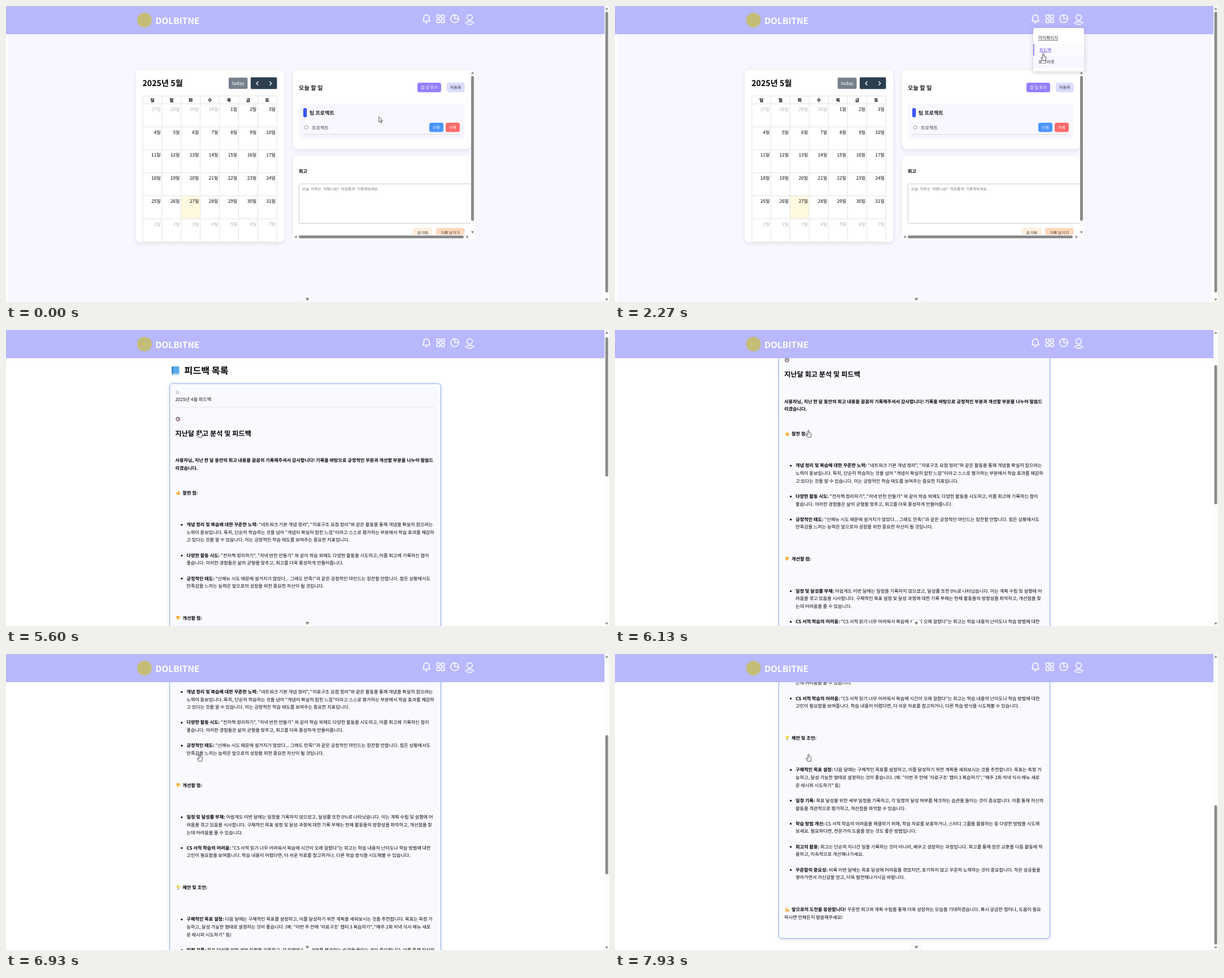
Recreate the animation shown at these times as an HTML page. Size 1067 by 525 pixels, loop 8 s.

```html
<!DOCTYPE html>
<html>
<head>
<meta charset="utf-8">
<style>
  html, body { margin: 0; width: 100%; height: 100%; overflow: hidden; background: #fff; }
  svg { display: block; width: 1067px; height: 525px; }
  text { font-family: 'Noto Sans CJK KR', 'Noto Sans CJK', 'Noto Sans', sans-serif; text-rendering: geometricPrecision; white-space: pre; }
  .mono { font-family: 'Noto Sans Mono CJK KR', 'Noto Sans Mono', monospace; }
  .m { font-weight: 500; }
  .b { font-weight: 700; }
  .u { text-decoration: underline; }
  .soft { filter: drop-shadow(0 2px 3px rgba(60, 60, 110, .13)); }
</style>
</head>
<body>
<svg id="stage" viewBox="0 0 1067 525"></svg>
<script>
const BODY = 8.155, LINE = 13.63;

// cy is the optical middle of the line of text
const text = (x, cy, size, str, attrs = '') =>
  `<text x="${x}" y="${cy + size * .38}" font-size="${size}" ${attrs}>${str}</text>`;
const box = (x, y, x2, y2, fill, r = 0, attrs = '') =>
  `<rect x="${x}" y="${y}" width="${x2 - x}" height="${y2 - y}" rx="${r}" fill="${fill}" ${attrs}/>`;
const path = (d, attrs) => `<path d="${d}" ${attrs}/>`;
const button = (x, y, x2, y2, fill, label, color, size = 7.1) =>
  box(x, y, x2, y2, fill, 3.5) +
  text((x + x2) / 2, (y + y2) / 2 + .3, size, label, `class="m" text-anchor="middle" fill="${color}"`);
const triangle = (x, y, angle, size = 2.6) =>
  path(`M${-size} ${size * .8}L0 ${-size * .8}L${size} ${size * .8}Z`,
    `transform="translate(${x} ${y}) rotate(${angle})" fill="#858585"`);

function header() {
  const square = (x, y) => box(x, y, x + 5.6, y + 5.6, 'none', 1.5);
  return `<circle cx="245" cy="25" r="13" fill="#c3bd78"/>` +
    text(264.5, 26, 15.4, 'DOLBITNE', 'class="b" fill="#fff"') +
    `<g fill="none" stroke="#fff" stroke-width="1.6" stroke-linecap="round" stroke-linejoin="round">` +
    path('M737.8 26.8H750.2C748.7 25 748.8 23 748.7 20.5a4.7 4.9 0 0 0-9.4 0C739.2 23 739.3 25 737.8 26.8ZM742.3 29.6h3.4') +
    square(762.3, 15.7) + square(770.3, 15.7) + square(762.3, 23.8) + square(770.3, 23.8) +
    path('M794 15.5a7 7 0 1 0 7 7a7 7 0 0 0-7-7V22.5H801') +
    `<circle cx="820.5" cy="20.2" r="4.8"/>` +
    path('M813 30.8C816 26.2 825 26.2 828 30.8M816.5 32Q820.5 33 824.5 32') + '</g>';
}

function calendar() {
  const left = 242, top = 173.5, w = 33.9, h = 40.75;
  let s = box(229.5, 113.5, 492.5, 419, '#fff', 8, 'class="soft"') +
    text(241.5, 137, 14.2, '2025년 5월', 'class="b"') +
    box(394, 127, 427.5, 147, '#76818d', 2) +
    text(410.7, 137.2, BODY, 'today', 'text-anchor="middle" fill="#fff"') +
    box(433, 126.5, 479.5, 147.3, '#2c3e50', 2) +
    path('M446.5 133.7L443.2 137.2L446.5 140.7M466.5 133.7L469.8 137.2L466.5 140.7',
      'fill="none" stroke="#fff" stroke-width="1.3"') +
    box(left + 2 * w, top + 4 * h, left + 3 * w, top + 5 * h, '#fffadf');
  let lines = `M${left} 159.5h${7 * w}`;
  for (let r = 0; r < 7; r++) lines += `M${left} ${top + r * h}h${7 * w}`;
  for (let c = 0; c < 8; c++) lines += `M${left + c * w} 159.5V${top + 6 * h}`;
  s += path(lines, 'fill="none" stroke="#ddd" stroke-width=".8"');
  [...'일월화수목금토'].forEach((d, c) =>
    s += text(left + (c + .5) * w, 167, BODY, d, 'class="b" text-anchor="middle"'));
  for (let i = 0; i < 42; i++) {
    const n = i - 3, day = n < 1 ? n + 30 : n > 31 ? n - 31 : n;
    s += text(left + (i % 7 + 1) * w - 2.2, top + (i / 7 | 0) * h + 9.2, BODY, day + '일',
      `text-anchor="end" fill-opacity="${n === day ? 1 : .3}"`);
  }
  return s;
}

function todo() {
  return `<clipPath id="pane"><rect x="498" y="104" width="324" height="301.5"/></clipPath>` +
    box(508, 404, 829, 414, '#fcfcfd') + box(821.5, 113.5, 829, 414, '#fcfcfd') +
    `<g clip-path="url(#pane)">` +
    box(508, 113.5, 822, 254, '#fff', 8, 'class="soft"') +
    text(518, 145, 10.3, '오늘 할 일', 'class="b" fill="#222"') +
    button(728, 136, 770, 153, '#9381ff', '할 일 추가', '#fff') +
    button(780, 136, 811.5, 153, '#dcdcff', '자동화', '#333') +
    box(518, 173, 811.5, 236, '#f8f7ff', 4) +
    box(526, 181, 532.3, 197.5, '#3a55ff', 3) +
    text(537, 189.3, 9.1, '팀 프로젝트', 'class="b" fill="#222"') +
    box(528.6, 212.7, 534, 218.1, '#fff', 1, 'stroke="#767676" stroke-width=".7"') +
    text(541, 215.6, BODY, '프로젝트', 'fill="#444"') +
    button(749, 207, 774, 223.5, '#4d96ff', '수정', '#fff', 6.8) +
    button(778, 207, 803, 223.5, '#ff6b6b', '삭제', '#fff', 6.8) +
    box(526, 227.5, 803, 228.3, '#ccc') +
    box(508, 266, 822, 425, '#fff', 8, 'class="soft"') +
    text(518, 293, BODY, '회고', 'class="b"') +
    box(518.3, 315.6, 840, 385.6, '#fff', 2, 'stroke="#bbb" stroke-width=".8"') +
    text(524, 324, 6.7, '오늘 하루는 어땠나요? 자유롭게 기록해보세요.', 'class="mono" fill="#757575"') +
    button(720, 393.5, 754.5, 411.5, '#ffeedd', '초기화', '#333') +
    button(761, 393.5, 811.5, 411.5, '#ffd8be', '기록 남기기', '#333') + '</g>' +
    box(823, 124, 828, 381, '#8b8b8b', 2.5) + triangle(825.5, 118.5, 0) + triangle(825.5, 401.5, 180) +
    box(518, 407, 810, 412, '#8b8b8b', 2.5) + triangle(512.5, 409.5, -90) + triangle(816.8, 409.5, 90);
}

const ITEMS = [
  [345, '잘한 점:', [
    ['개념 정리 및 복습에 대한 꾸준한 노력:| "네트워크 기본 개념 정리", "자료구조 요점 정리"와 같은 활동을 통해 개념을 확실히 잡으려는',
      '노력이 돋보입니다. 특히, 단순히 학습하는 것을 넘어 "개념이 확실히 잡힌 느낌"이라고 스스로 평가하는 부분에서 학습 효과를 체감하',
      '고 있다는 것을 알 수 있습니다. 이는 긍정적인 학습 태도를 보여주는 중요한 지표입니다.'],
    ['다양한 활동 시도:| "전자책 정리하기", "저녁 반찬 만들기" 와 같이 학습 외에도 다양한 활동을 시도하고, 이를 회고에 기록하신 점이',
      '좋습니다. 이러한 경험들은 삶의 균형을 맞추고, 회고를 더욱 풍성하게 만들어줍니다.'],
    ['긍정적인 태도:| "신메뉴 시도 때문에 설거지가 많았다... 그래도 만족!"과 같은 긍정적인 마인드는 칭찬할 만합니다. 힘든 상황에서도',
      '만족감을 느끼는 능력은 앞으로의 성장을 위한 중요한 자산이 될 것입니다.']]],
  [567.3, '개선할 점:', [
    ['일정 및 달성률 부재:| 아쉽게도 이번 달에는 일정을 기록하지 않으셨고, 달성률 또한 0%로 나타났습니다. 이는 계획 수립 및 실행에 어',
      '려움을 겪고 있음을 시사합니다. 구체적인 목표 설정 및 달성 과정에 대한 기록 부재는 현재 활동들의 방향성을 파악하고, 개선점을 찾',
      '는데 어려움을 줄 수 있습니다.'],
    ['CS 서적 학습의 어려움:| "CS 서적 읽기 너무 어려워서 복습에 시간이 오래 걸렸다"는 회고는 학습 내용의 난이도나 학습 방법에 대한',
      '고민이 필요함을 보여줍니다. 학습 내용이 어렵다면, 더 쉬운 자료를 참고하거나, 다른 학습 방식을 시도해볼 수 있습니다.']]],
  [748.5, '제안 및 조언:', [
    ['구체적인 목표 설정:| 다음 달에는 구체적인 목표를 설정하고, 이를 달성하기 위한 계획을 세워보시는 것을 추천합니다. 목표는 측정 가',
      '능하고, 달성 가능한 형태로 설정하는 것이 좋습니다. (예: "이번 주 안에 \'자료구조\' 챕터 3 복습하기", "매주 2회 저녁 식사 메뉴 새로',
      '운 레시피 시도하기" 등)'],
    ['일정 기록:| 목표 달성을 위한 세부 일정을 기록하고, 각 일정의 달성 여부를 체크하는 습관을 들이는 것이 중요합니다. 이를 통해 자신의',
      '활동을 객관적으로 평가하고, 개선점을 파악할 수 있습니다.'],
    ['학습 방법 개선:| CS 서적 학습의 어려움을 해결하기 위해, 학습 자료를 보충하거나, 스터디 그룹을 활용하는 등 다양한 방법을 시도해',
      '보세요. 필요하다면, 전문가의 도움을 받는 것도 좋은 방법입니다.'],
    ['회고의 활용:| 회고는 단순히 지나간 일을 기록하는 것이 아니라, 배우고 성장하는 과정입니다. 회고를 통해 얻은 교훈을 다음 활동에 적',
      '용하고, 지속적으로 개선해나가세요.'],
    ['꾸준함의 중요성:| 비록 이번 달에는 목표 달성에 어려움을 겪었지만, 포기하지 않고 꾸준히 노력하는 것이 중요합니다. 작은 성공들을',
      '쌓아가면서 자신감을 얻고, 더욱 발전해나가시길 바랍니다.']]]
];

const rich = str => {
  const [bold, rest] = str.split('|');
  return rest === undefined ? str : `<tspan class="b">${bold}</tspan>${rest}`;
};

// Small pictograms, centred on the origin
const THUMB = path('M-3.2-.3L-1-.8L.2-4Q1.6-4 1.3-1.2L3.2-.8Q3.8 3.6 1.6 3.8H-1.6Q-3.6 3.4-3.2-.3Z', 'fill="#f9b23c"');
const ICONS = [
  THUMB,
  `<g transform="rotate(180)">${THUMB}</g>`,
  path('M-1.3 1.6Q-3-.2-2.8-1.5A2.8 2.7 0 0 1 2.8-1.5Q3-.2 1.3 1.6Z', 'fill="#fcd35a"') + box(-1.2, 1.6, 1.2, 4, '#a99a84', .6),
  path('M-3.8 2.8L-2.6-3.4Q-.8-4.4 0-2.8L-1.2-1.4L-.9.5Q1.8-1.8 3.8.6Q4.6 3.6 1.5 3.7Q-2 4-3.8 2.8Z', 'fill="#f9b64c"')
];
const icon = (i, y) => `<g transform="translate(304.7 ${y})">${ICONS[i]}</g>`;

function listHead() {
  return box(293.5, 64.5, 306.5, 79.5, '#5cabea', 1) + box(293.5, 64.5, 296, 79.5, '#2f7fc4', 1) +
    box(294.3, 77.3, 306.5, 78.7, '#d5ecfa') +
    text(315.5, 72, 16.2, '피드백 목록', 'class="b"');
}

function cardHead() {
  return box(301.3, 108, 305.6, 113.3, '#eee', .5, 'stroke="#aaa" stroke-width=".6"') +
    box(302.8, 109.8, 304.1, 111.8, '#aaa') +
    text(299.5, 123, BODY, '2025년 4월 피드백', 'class="m" fill="#111"');
}

function feedback() {
  let s = box(289.7, 95, 769.5, 1048, '#f9faff', 5, 'class="soft" stroke="#6f9fee" stroke-width=".9"') +
    path('M299.5 136.8H759.5', 'stroke="#ccc" stroke-width=".7" stroke-dasharray="1.8 1.4"') +
    `<circle cx="304.3" cy="158" r="3.2" fill="#e6e0e2" stroke="#6d5560" stroke-width="1.2"/>` +
    path('M304.3 155.8V158.2H306.3', 'fill="none" stroke="#8a3f48" stroke-width=".8"') +
    text(299.5, 183, 12.2, '지난달 회고 분석 및 피드백', 'class="b"') +
    text(299.5, 231.2, BODY, '사용자님, 지난 한 달 동안의 회고 내용을 꼼꼼히 기록해주셔서 감사합니다! 기록을 바탕으로 긍정적인 부분과 개선할 부분을 나누어 말씀드', 'class="b"') +
    text(299.5, 245, BODY, '리겠습니다.', 'class="b"');
  ITEMS.forEach(([y, title, bullets], i) => {
    s += icon(i, y - 56.5) + text(312.5, y - 56.5, BODY, title, 'class="b"');
    for (const lines of bullets) {
      s += `<circle cx="311" cy="${y + .4}" r="1.6"/>`;
      for (const line of lines) {
        s += text(319.5, y, BODY, rich(line));
        y += LINE;
      }
      y += LINE;
    }
  });
  return s + icon(3, 996.5) +
    text(312.5, 996.2, BODY, rich('앞으로의 도전을 응원합니다!| 꾸준한 회고와 계획 수립을 통해 더욱 성장하는 모습을 기대하겠습니다. 혹시 궁금한 점이나, 도움이 필요')) +
    text(299.5, 1009.8, BODY, '하시면 언제든지 말씀해주세요!');
}

const MENU = [[46, 67, '마이페이지', 7.6], [67, 88.3, '피드백', 7.7], [88.3, 110, '로그아웃', 7.9]];
const menu = () => box(740, 39, 830, 116, '#fff', 4, 'style="filter:drop-shadow(0 2px 4px rgba(0,0,0,.18))"') +
  MENU.map(([y, y2, label, size], i) =>
    box(740, y, 830, y2, '#f3f3ff', 0, `id="bg${i}"`) +
    box(740, y, 741.8, y2, '#9381ff', 0, `id="edge${i}"`) +
    text(749, (y + y2) / 2, size, label, `id="item${i}" ${i < 2 ? 'class="u"' : ''}`)).join('');

const $ = id => document.getElementById(id);
$('stage').innerHTML =
  `<g id="home">${box(4, 50, 1055, 525, '#f8f7ff')}${calendar()}${todo()}</g>` +
  `<g id="list">${listHead()}<g id="closed">` +
  box(289.5, 95, 769.5, 139, '#fff', 5, 'class="soft" stroke="#ddd" stroke-width=".9"') +
  `</g><g id="open">${feedback()}</g>${cardHead()}</g>` +
  box(0, 0, 1067, 50, '#b8b8ff') + `<g id="head">${header()}</g>` +
  `<g id="bar">${box(1059, 0, 1067, 525, '#fcfcfc')}${triangle(1063, 4.5, 0)}${triangle(1063, 521, 180)}` +
  box(1060.5, 0, 1065.5, 1, '#8b8b8b', 2.5, 'id="thumb"') + '</g>' +
  `<circle cx="533.3" cy="520.5" r="8.3" fill="#fff" stroke="#e4e4ea" stroke-width=".8"/>` +
  triangle(533.3, 520.5, 180, 3.4) +
  `<g id="menu">${menu()}</g>` +
  `<g id="cursor" fill="#fff" stroke="#222" stroke-width=".8" stroke-linejoin="round">` +
  path('M0 0V9.4L2.2 7.5L3.8 11L5.2 10.4L3.7 7H6.4Z', 'id="arrow"') +
  path('M-.6 1.2a1.1 1.1 0 0 1 2.2 0V4.8L4.5 5.5Q5.7 5.9 5.6 7.1L4.8 10.4V12.8H-1.1L-3.5 8.7Q-3.8 7.3-2.5 7.4L-.6 8.8Z', 'id="hand"') + '</g>';

// time, x, y of the hot spot, and whether the hand is showing
const MOVES = [
  [0, 660, 196.5, 0], [470, 836, 30, 0], [600, 836, 30, 0], [730, 828, 20, 1], [930, 820, 16, 1],
  [1530, 820, 16, 1], [1870, 795, 60, 1], [2070, 762, 95, 1], [2190, 760, 93, 1], [2265, 757.5, 84, 1],
  [3150, 757.5, 84, 0], [3330, 446, 152, 0], [3400, 446, 152, 0], [3465, 438.5, 149, 0],
  [3600, 415, 142, 1], [3930, 341, 124, 1], [5130, 341, 124, 1], [5400, 342, 177.5, 1], [9000, 342, 177.5, 1]
];
const WHEEL = [5558, 6058, 6475, 6882, 7280, 7680];

const ease = x => (x = Math.max(0, Math.min(1, x)), x * x * (3 - 2 * x));
function pointer(t) {
  const i = MOVES.findIndex(m => m[0] > t), [t0, x0, y0, hand] = MOVES[i - 1], [t1, x1, y1] = MOVES[i];
  const p = ease((t - t0) / (t1 - t0));
  return { x: x0 + (x1 - x0) * p, y: y0 + (y1 - y0) * p, hand };
}
const scrollAt = t => WHEEL.reduce((sum, start) => sum + 91.7 * ease((t - start) / 250), 0);

const set = (id, attrs) => { for (const k in attrs) $(id).setAttribute(k, attrs[k]); };
const show = (id, on) => set(id, { display: on ? 'inline' : 'none' });

function draw(t) {
  const home = t < 2865, open = t > 4865, scroll = scrollAt(t), dx = home || open ? 0 : 4.2;
  show('home', home);
  show('list', !home);
  show('closed', !open);
  show('open', open);
  show('bar', !dx);
  set('list', { transform: `translate(${dx} ${7 - scroll})` });
  set('head', { transform: `translate(${dx} 0)` });
  set('thumb', home ? { y: 10, height: 498 } : { y: 9.7 + scroll * .47, height: 247 });

  set('menu', { opacity: !home || t < 1195 ? 0 : t < 1325 ? .6 : 1 });
  MENU.forEach(([y, y2], i) => {
    const over = time => { const p = pointer(Math.max(0, time)); return p.x > 740 && p.y >= y && p.y < y2 ? 1 : 0; };
    const on = over(t);
    set('bg' + i, { opacity: (on + over(t - 67) + over(t - 133)) / 3 });
    set('edge' + i, { opacity: on });
    set('item' + i, { x: on ? 750.8 : 749, fill: on ? '#5f48f0' : '#333' });
  });

  const p = pointer(t);
  set('cursor', { transform: `translate(${p.x} ${p.y})` });
  show('arrow', !p.hand);
  show('hand', p.hand);
}

const start = performance.now();
(function tick() {
  const t = (performance.now() - start) % 8000;
  draw(Math.floor((t + 4) * .015) / .015);
  requestAnimationFrame(tick);
})();
</script>
</body>
</html>
```
